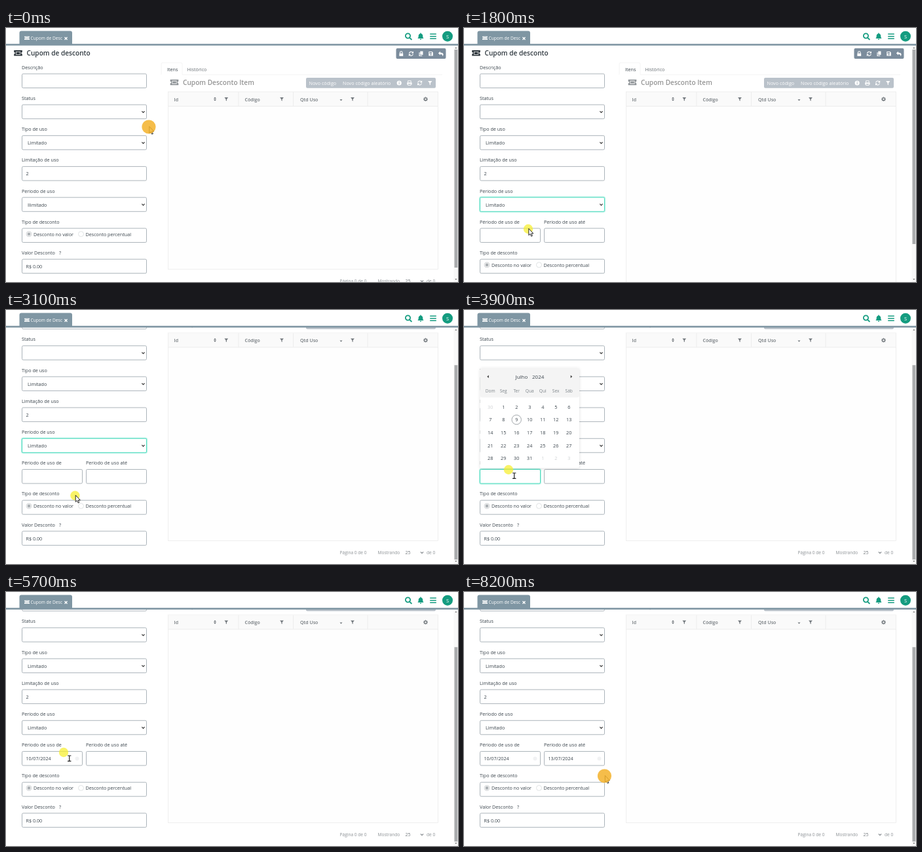
Recreate the animation shown at these times as an HTML page. Size 690 by 388 pixels, loop 8900 ms.

```html
<!DOCTYPE html>
<html lang="pt-BR">
<head>
<meta charset="utf-8">
<title>Cupom de desconto</title>
<style>
html, body { margin: 0; width: 100%; height: 100%; overflow: hidden; background: #fff }
svg { display: block; width: 690px; height: 388px; font: 7.2px "Open Sans", "Noto Sans", sans-serif }
text { white-space: pre }
</style>
</head>
<body>
<svg id="stage" viewBox="0 0 690 388"></svg>
<script>
const LOOP = 8900, STEP = 100, SCROLL = 62.5, ROW = 47.2;
const INK = '#3a444c', GREEN = '#149c80', SLATE = '#7f96a3';

// name: [filled path, stroked path, line width]
const ICONS = {
  ticket: ['M-6.3-4.3h12.6v2.8a1.5 1.5 0 0 0 0 3v2.8h-12.6v-2.8a1.5 1.5 0 0 0 0-3zM-3.6-2.4v4.8h7.2v-4.8zM-2.8-1.6h5.6v3.2h-5.6z'],
  lock: ['M-2.9-.6h5.8v4.2h-5.8z', 'M-1.8-.5v-1.2a1.8 1.8 0 0 1 3.6 0v1.2', 1.1],
  sync: ['M3.6-3.7v3.2h-3.2zM-3.6 3.7v-3.2h3.2z', 'M-3-.5a3.1 3.1 0 0 1 5.5-1.3M3 .5a3.1 3.1 0 0 1-5.5 1.3', 1.1],
  copy: ['M-1.2-3.7h4.2v5.4h-4.2zM-3-2h1.1v4.6h3.7v1.1h-4.8z'],
  save: ['M-3.3-3.3h5.2l1.4 1.4v5.2h-6.6zM-2.3-2.3v1.7h3.8v-1.7zM-1.1 1.3a1.1 1.1 0 1 0 2.2 0a1.1 1.1 0 1 0-2.2 0z'],
  reply: ['M-3.9-.8l3.2-2.8v1.7c3 0 4.6 1 4.6 3c0 1.2-.6 2-1.6 2.5c.6-2-.4-3-3-3v1.6z'],
  info: ['M-3.6 0a3.6 3.6 0 1 0 7.2 0a3.6 3.6 0 1 0-7.2 0zM-.6-2.2h1.2v1.1h-1.2zM-.6-.5h1.2v2.6h-1.2z'],
  print: ['M-3.7-.8h7.4v3.2h-1.3v-1.2h-4.8v1.2h-1.3z', 'M-2.3-1v-2.3h4.6v2.3M-2.2 1.4v2h4.4v-2', 0.9],
  filter: ['M-3.2-3h6.4l-2.5 3v3.2l-1.4-1v-2.2z'],
  sort: ['M-2-.5l2-2.4 2 2.4zM-2 .5l2 2.4 2-2.4z'],
  caret: ['M-2-1h4l-2 2.2z'],
  gear: ['', 'M-1.9 0a1.9 1.9 0 1 0 3.8 0a1.9 1.9 0 1 0-3.8 0M0-3.4v1.2M0 2.2v1.2M-3.4 0h1.2M2.2 0h1.2M-2.4-2.4l.8.8M1.6 1.6l.8.8M-2.4 2.4l.8-.8M1.6-1.6l.8-.8', 1.2],
  search: ['', 'M-4.6-1a3.6 3.6 0 1 0 7.2 0a3.6 3.6 0 1 0-7.2 0M1.7 1.8l3.2 3.2', 1.8],
  bell: ['M-4.6 3c1.2-1.2 1.3-2.4 1.3-4c0-2 1.2-3.3 2.7-3.6v-.8h1.2v.8c1.5.3 2.7 1.6 2.7 3.6c0 1.6.1 2.8 1.3 4zM-1.3 3.8h2.6a1.3 1.3 0 0 1-2.6 0z'],
  bars: ['', 'M-4.8-3.5h9.6M-4.8 0h9.6M-4.8 3.5h9.6', 1.6],
  cross: ['', 'M-2-2l4 4M2-2l-4 4', 1.4],
  chevron: ['', 'M-2.1-1l2.1 2.1 2.1-2.1', 1.2],
  left: ['M1.3-2.2v4.4l-2.6-2.2z'],
  right: ['M-1.3-2.2v4.4l2.6-2.2z']
};

// time, x, y
const PATH = [
  [0, 218, 151], [900, 95, 269], [1100, 95, 269], [1300, 92, 294], [1500, 92, 296],
  [1800, 98, 307], [2300, 118, 325], [2900, 118, 325], [3200, 101, 269], [3500, 68, 244],
  [4200, 68, 244], [4900, 107, 167], [5200, 107, 167], [5700, 88, 245], [5800, 88, 245],
  [6400, 160, 246], [6900, 160, 246], [7200, 237.5, 168], [7400, 257, 168], [7600, 257, 168],
  [8200, 214.5, 281]
];
const CLICKS = [0, 1000, 1500, 3700, 5000, 6500, 7600];
const POINTERS = [[0, 'arrow'], [3400, 'beam'], [4300, 'hand'], [5200, 'arrow'], [5600, 'beam'],
  [5900, 'arrow'], [6200, 'beam'], [7000, 'hand'], [7700, 'arrow']];

const ease = u => (u = Math.min(1, Math.max(0, u)), u * u * (3 - 2 * u));
const within = (t, a, b) => t >= a && t < b;

function pointerAt(t) {
  let i = PATH.findIndex(k => k[0] > t);
  if (i < 0) return PATH.at(-1).slice(1);
  const [t0, x0, y0] = PATH[i - 1], [t1, x1, y1] = PATH[i], u = ease((t - t0) / (t1 - t0));
  return [x0 + (x1 - x0) * u, y0 + (y1 - y0) * u];
}

// y is the middle of the capitals
const text = (x, y, s, fill = INK, size = 7.2, more = '') =>
  `<text x="${x}" y="${y + size * .36}" font-size="${size}" fill="${fill}" ${more}>${s}</text>`;
const bold = (x, y, s, fill, size) => text(x, y, s, fill, size, 'font-weight="600"');
const mid = (x, y, s, fill, size) => text(x, y, s, fill, size, 'text-anchor="middle"');
const rect = (x, y, w, h, fill, more = '') =>
  `<rect x="${x}" y="${y}" width="${w}" height="${h}" fill="${fill}" ${more}/>`;
const disc = (x, y, r, fill, more = '') => `<circle cx="${x}" cy="${y}" r="${r}" fill="${fill}" ${more}/>`;
const line = (d, color) => `<path d="${d}" fill="none" stroke="${color}" stroke-width=".8"/>`;

function icon(name, x, y, color, scale = 1) {
  const [fill, stroke, w] = ICONS[name];
  return `<g transform="translate(${x} ${y}) scale(${scale})">` +
    (fill ? `<path d="${fill}" fill="${color}" fill-rule="evenodd"/>` : '') +
    (stroke ? `<path d="${stroke}" fill="none" stroke="${color}" stroke-width="${w}"/>` : '') + '</g>';
}

function box(x, y, w, focus) {
  return (focus ? rect(x - .5, y - .5, w + 1, 22.5, 'none', 'rx="2" stroke="#b8f3e6" stroke-width="2"') : '') +
    rect(x, y, w, 21.5, '#fff', `rx="1.8" stroke="${focus ? '#3ed6b8' : '#a3acb3'}" stroke-width=".9"`);
}
const field = (y, label, value = '', x = 24.5, w = 190, focus = false) =>
  text(x - .5, y, label) + box(x, y + 9.8, w, focus) + text(x + 6, y + 21, value);
const select = (y, label, value, focus) =>
  field(y, label, '', 24.5, 190, focus) + text(33, y + 21, value) + icon('chevron', 209.5, y + 20.7, '#333');

function form(t) {
  const limited = t >= 1500, y = i => 60.2 + ROW * i, shift = limited ? 1 : 0;
  const radio = y(5 + shift) + 19;
  let s = icon('ticket', 18.5, 38.3, '#2c343a') + bold(31.5, 38.3, 'Cupom de desconto', '#2f383f', 10.15) +
    rect(595.5, 31, 76, 16, '#7b8c9c', 'rx="2"') +
    ['lock', 'sync', 'copy', 'save', 'reply'].map((n, i) => icon(n, 603.3 + 15.1 * i, 39.3, '#fff')).join('') +
    field(y(0), 'Descrição') + select(y(1), 'Status', '') + select(y(2), 'Tipo de uso', 'Limitado') +
    field(y(3), 'Limitação de uso', '2') +
    select(y(4), 'Período de uso', limited ? 'Limitado' : 'Ilimitado', within(t, 1000, 3700));
  if (limited) {
    const from = t >= 5100, to = t >= 7700;
    s += field(y(5), 'Périodo de uso de', from ? '10/07/2024' : '', 24.5, 92, within(t, 3700, 5100)) +
      field(y(5), 'Período de uso até', to ? '13/07/2024' : '', 122.5, 92, within(t, 6600, 7700)) +
      (from ? disc(108.5, y(5) + 20.8, 3, '#f1f2f3') : '') + (to ? disc(206.5, y(5) + 20.8, 3, '#f1f2f3') : '');
  }
  s += field(y(5 + shift), 'Tipo de desconto') +
    disc(35, radio - .5, 4, '#f4f4f4', 'stroke="#c9cdd0" stroke-width=".8"') + disc(35, radio - .5, 2.3, '#a9aeb2') +
    disc(114.5, radio - .5, 4, '#fff', 'stroke="#d9dcde" stroke-width=".8"') +
    text(42, radio, 'Desconto no valor') + text(121.5, radio, 'Desconto percentual') +
    field(y(6 + shift), 'Valor Desconto', 'R$ 0.00') + text(81, y(6 + shift), '?');
  return s;
}

function table(limited) {
  const bottom = limited ? 415 : 368.5, foot = bottom + 18, gray = '#8b9094', head = '#70767b';
  return line('M237 71.3V55q0-2 2-2h28q2 0 2 2v16.3H666', '#f1f1f1') +
    text(246, 63, 'Itens') + text(276.5, 63, 'Histórico', '#666d72') +
    icon('ticket', 257, 83, '#8d9296') + bold(270, 83.3, 'Cupom Desconto Item', '#949494', 10.15) +
    rect(458, 76, 198, 15.8, '#bac2ca', 'rx="2"') +
    text(462.5, 84, 'Novo código', '#fff') + text(514, 84, 'Novo código aleatório', '#fff') +
    ['info', 'print', 'sync', 'filter'].map((n, i) => icon(n, 600.2 + 15.7 * i, 84, '#fff')).join('') +
    rect(247.5, 97.5, 412, bottom - 97.5, '#fefefe', 'stroke="#ececec" stroke-width=".8"') +
    rect(248, 98, 411, 21.5, '#fafafa') +
    line('M247.5 119.5H659.5M355 98V119M438.5 98V119M552 98V119', '#e9e9e9') +
    bold(256.5, 109, 'Id', head, 7) + bold(364.5, 109, 'Código', head, 7) + bold(449, 109, 'Qtd Uso', head, 7) +
    icon('sort', 319, 108.5, head) + icon('caret', 511.5, 110, head) + icon('gear', 640.5, 108.7, head) +
    [336.3, 421, 529].map(x => icon('filter', x, 108.7, head, .9)).join('') +
    text(509.5, foot, 'Página 0 de 0', gray, 6.6) + text(567.5, foot, 'Mostrando', gray, 6.6) +
    text(609.5, foot, '25', '#777d81') + icon('chevron', 635, foot, gray) + text(642, foot, 'de 0', gray, 6.6);
}

function dropdown(t) {
  const hover = t >= 1300 ? 1 : 0;
  return rect(24.5, 281.5, 190.5, 22.5, '#fff', 'stroke="#8d959b" stroke-width=".8"') +
    rect(25, 282 + 11 * hover, 189.5, 11, '#1e74d2') +
    ['Ilimitado', 'Limitado'].map((s, i) => text(28, 287.3 + 11 * i, s, i === hover ? '#fff' : INK)).join('');
}

function calendar(x, px, py, hover) {
  let s = rect(x, 88.5, 151.5, 153, '#fff', 'rx="3" style="filter:drop-shadow(0 1px 2px #0002)"') +
    rect(x, 88.5, 151.5, 45, '#f4f4f4', 'rx="3"') +
    icon('left', x + 12, 101.8, '#444') + icon('right', x + 139.5, 101.8, '#444') +
    text(x + 54, 102, 'Julho', INK, 8) + text(x + 79.5, 102, '2024', INK, 8);
  ['Dom', 'Seg', 'Ter', 'Qua', 'Qui', 'Sex', 'Sáb'].forEach((d, i) => s += mid(x + 15.7 + 20 * i, 123.3, d, '#7e858a', 6.6));
  for (let i = 0; i < 35; i++) {
    const cx = x + 15.7 + 20 * (i % 7), cy = 148.3 + 19.6 * Math.floor(i / 7);
    const other = i === 0 || i > 31, on = hover && Math.hypot(px - cx, py - cy) < 9;
    if (i === 9) s += disc(cx, cy - .3, 7.2, '#fff', 'stroke="#8b9196" stroke-width=".8"');
    if (on) s += disc(cx, cy - .3, 7.4, '#637385');
    s += mid(cx, cy, i === 0 ? 30 : i > 31 ? i - 31 : i, on ? '#fff' : other ? '#cfd2d4' : INK);
  }
  return s;
}

function scrollbar(t, scroll) {
  const top = 33 + scroll * .82;
  return rect(683.5, 27, 6.5, 361, '#f8f8f8') +
    rect(684.5, top, 4.8, t < 1500 ? 333 : 297, '#a9abad') +
    '<path d="M685.3 31.2h3.2l-1.6-2zM685.3 383h3.2l-1.6 2z" fill="#777"/>';
}

const HEADER = rect(0, 0, 690, 25, '#fff') +
  `<path d="M20.5 25V7.5q0-3 3-3h74.5q3 0 3 3V25z" fill="${SLATE}"/>` + rect(0, 24.2, 690, 2.6, SLATE) +
  '<clipPath id="tab"><path d="M20 4h66v20h-66z"/></clipPath>' +
  icon('ticket', 32, 15.3, '#fff', .62) +
  text(37.5, 15.5, 'Cupom de Desconto', '#fff', 6.6, 'clip-path="url(#tab)"') + icon('cross', 91.5, 16, '#fff') +
  icon('search', 614.5, 13, GREEN) + icon('bell', 633, 13, GREEN) + icon('bars', 652, 12.8, GREEN) +
  disc(674, 12.7, 8, GREEN) + mid(674, 12.8, 'S', '#fff', 7.6);

const SHAPES = {
  arrow: '<path d="M.8-.6v10.2l2.3-2.1 1.6 3.7 1.7-.7-1.6-3.6h3.1z" fill="#fff" stroke="#111" stroke-width=".9"/>',
  beam: '<path d="M6 5h2.2q.5 0 .5.6v7.2q0 .6-.5.6h-2.2M11.4 5h-2.2q-.5 0-.5.6v7.2q0 .6.5.6h2.2" fill="none" stroke="#222" stroke-width="1.2"/>',
  hand: '<path d="M.6.6q1-.9 1.8.2v3.2l3.6.8q1 .3.9 1.4l-.8 4.2h-4.2l-2.6-3.8q.2-1.3 1.3-.4z" fill="#fff" stroke="#111" stroke-width=".8"/>'
};

function cursor(t, x, y, shape) {
  const pressed = t >= 8200 || CLICKS.includes(t);
  return `<g transform="translate(${x} ${y})">` +
    (pressed ? '' : disc(0, 0, 7.2, '#f6ee2c', 'opacity=".72"')) + SHAPES[shape] +
    (pressed ? disc(0, 0, 10.6, '#f3b12a', 'opacity=".85"') : '') + '</g>';
}

const stage = document.getElementById('stage');

function draw(t) {
  const scroll = SCROLL * ease((t - 2785) / 300), [x, y] = pointerAt(t);
  const shape = POINTERS.findLast(p => p[0] <= t)[1], hover = shape === 'hand';
  stage.innerHTML = `<g transform="translate(0 ${-scroll})">${form(t)}${table(t >= 1500)}</g>` +
    (within(t, 1100, 1500) ? dropdown(t) : '') +
    (within(t, 3700, 5100) ? calendar(24.5, x, y, hover) : '') +
    (within(t, 6600, 7700) ? calendar(122.3, x, y, hover) : '') +
    scrollbar(t, scroll) + HEADER + cursor(t, x, y, shape);
}

let start = null, shown = -1;
function tick(now) {
  start ??= now;
  const t = Math.floor((now - start) % LOOP / STEP) * STEP;
  if (t !== shown) draw(shown = t);
  requestAnimationFrame(tick);
}
draw(0);
requestAnimationFrame(tick);
</script>
</body>
</html>
```
